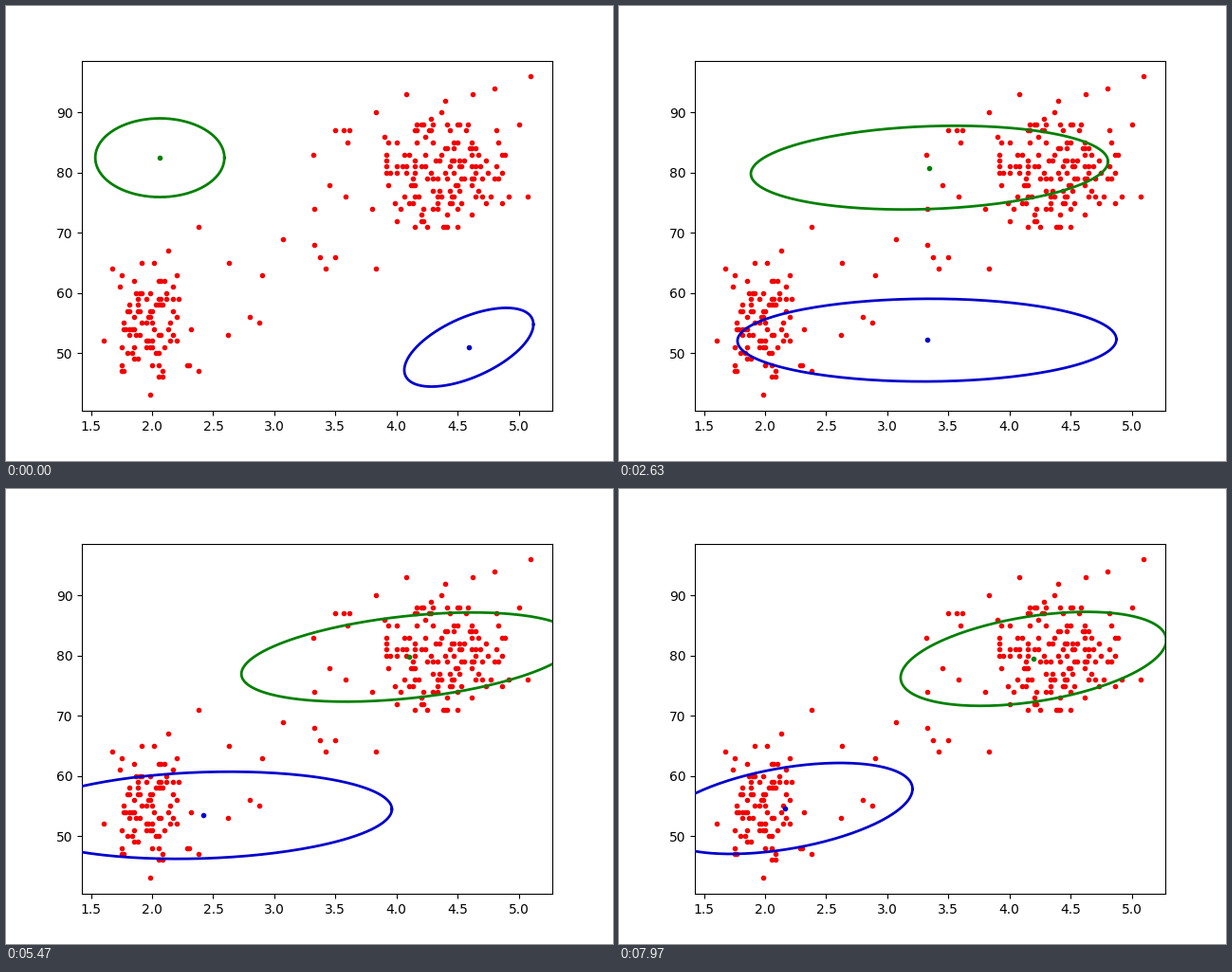
A matplotlib script for the animation above (8 s loop, 640x480 px).

```python
import numpy as np
import matplotlib.pyplot as plt
from matplotlib.animation import FuncAnimation

FRAMES = 240
LOOP_MS = 8000
KEYS = np.array([0, 33, 102, 191, 239]) / (FRAMES - 1)

# Lone points outside the two dense groups
LONERS = [
    (1.6, 52), (1.67, 64), (2.13, 67), (2.38, 71), (2.63, 65), (2.9, 63),
    (2.8, 56), (2.88, 55), (2.62, 53), (1.98, 43), (3.07, 69), (3.32, 83),
    (3.33, 74), (3.33, 68), (3.37, 66), (3.5, 66), (3.42, 64), (3.45, 78),
    (3.5, 87), (3.6, 85), (3.83, 64), (4.08, 93), (4.4, 92), (4.62, 93),
    (4.8, 94), (5.1, 96), (5.07, 76), (5.0, 88),
]


def cloud(rng, count, mean, sd, low, high):
    """Distinct normal points inside a box; x in sixtieths, y whole."""
    found = set()
    while len(found) < count:
        x, y = rng.normal(mean, sd)
        if low[0] <= x <= high[0] and low[1] <= y <= high[1]:
            found.add((round(x * 60) / 60, round(y)))
    return sorted(found)


def through(*values):
    """Smooth curve over the loop that meets the key times."""
    return np.poly1d(np.polyfit(KEYS, values, len(KEYS) - 1))


def smooth(u):
    u = min(u, 1)
    return u * u * (3 - 2 * u)


# Each takes s from 0 to 1: centre x, y, half width, half height, correlation
green_x = through(2.063, 2.646, 3.640, 4.177, 4.196)
green_var = through(0.279, 1.488, 2.187, 1.660, 1.182)
blue_x = through(4.592, 3.988, 3.026, 2.250, 2.166)
blue_var = through(0.279, 1.660, 2.512, 2.135, 1.082)


def green_state(s):
    return (green_x(s), 82.49 - 3.02 * s * (2 - s), np.sqrt(green_var(s)),
            6.55 + 1.27 * s, 0.4 * smooth(1.25 * s))


def blue_state(s):
    return (blue_x(s), 50.95 + 3.63 * s, np.sqrt(blue_var(s)),
            6.55 + 1.02 * s, 0.58 * np.exp(-15 * s) + 0.43 * s ** 3)


def outline(cx, cy, w, h, rho):
    a = np.linspace(0, 2 * np.pi, 241)
    return cx + w * np.cos(a), cy + h * np.cos(a - np.arccos(rho))


rng = np.random.default_rng(12)
short = cloud(rng, 86, (1.9, 54.5), (0.25, 5.5), (1.73, 45), (2.48, 65))
long = cloud(rng, 142, (4.35, 80), (0.34, 5), (3.56, 70), (4.95, 90))
xs, ys = np.array(LONERS + short + long).T

fig, ax = plt.subplots(figsize=(6.4, 4.8), dpi=100)
ax.plot(xs, ys, ".", color=(0.95, 0, 0))
ax.set_xlim(1.425, 5.275)
ax.set_ylim(40.35, 98.65)

shapes = []
for state, color in ((green_state, "green"), (blue_state, "mediumblue")):
    ring, = ax.plot([], [], color=color, lw=2, zorder=3)
    dot, = ax.plot([], [], ".", color=color, zorder=4)
    shapes.append((state, ring, dot))


def draw(frame):
    for state, ring, dot in shapes:
        now = state(frame / (FRAMES - 1))
        ring.set_data(*outline(*now))
        dot.set_data([now[0]], [now[1]])
    return [artist for _, *pair in shapes for artist in pair]


anim = FuncAnimation(fig, draw, frames=FRAMES, interval=LOOP_MS / FRAMES,
                     repeat=True, repeat_delay=0, blit=False)
plt.show()
```
